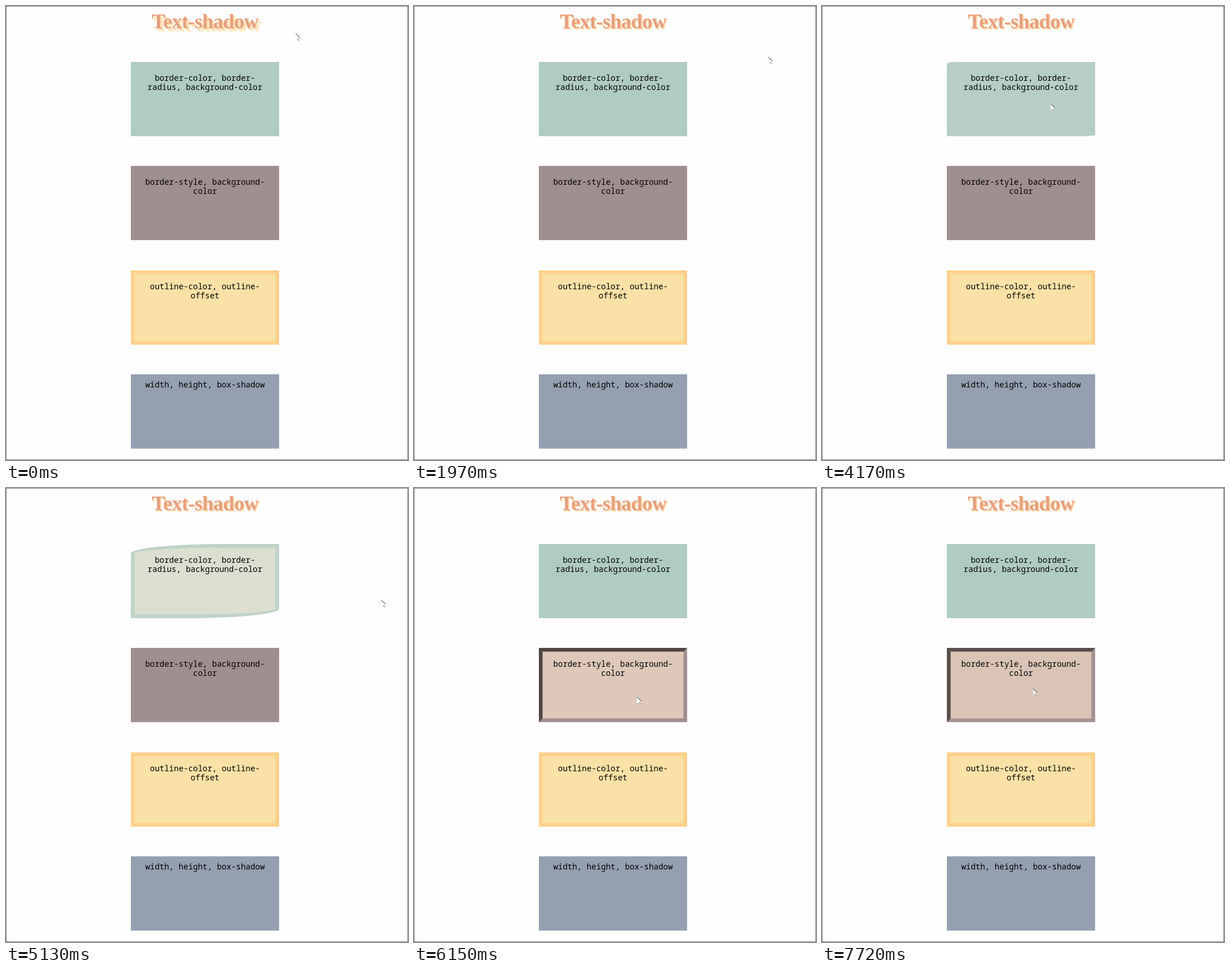
Animation of 705 by 795 pixels, one loop 8 s. Source, as an HTML page:

```html
<!DOCTYPE html>
<html lang="en">
<head>
<meta charset="utf-8">
<title>Hover transitions</title>
<style>
  html, body { margin: 0; width: 100%; height: 100%; overflow: hidden; background: #fefefe; }
  #stage {
    position: relative; width: 705px; height: 795px; box-sizing: border-box;
    overflow: hidden; border: 1px solid #7d7d7d;
  }
  #stage > * { position: absolute; }
  #title {
    left: 254.5px; top: 6px; margin: 0; white-space: nowrap; color: #e79f7f;
    font: bold 36px/40px "Liberation Serif", serif; letter-spacing: -.7px;
  }
  /* Boxes are laid out at 400 x 200 and shown at 65 %. */
  .box {
    left: 218.2px; top: calc(97.2px + 182.2px * var(--i));
    width: 400px; height: 200px; box-sizing: border-box; padding-top: 20px;
    transform: scale(.65); transform-origin: 0 0; border: 10px solid transparent;
    font: 21.5px/25px "Noto Sans Mono", monospace; text-align: center; white-space: nowrap; color: #000;
  }
  #radius { --i: 0; }
  #style { --i: 1; }
  #outline { --i: 2; background: #fae1a7; border-color: #ffd08c; }
  #size { --i: 3; background: #94a0b0; border: 0; padding-top: 15px; }
  #cursor { left: -1px; top: -1px; overflow: visible; }
</style>
</head>
<body>
<div id="stage">
  <h1 id="title">Text-shadow</h1>
  <div class="box" id="radius">border-color, border-<br>radius, background-color</div>
  <div class="box" id="style">border-style, background-<br>color</div>
  <div class="box" id="outline">outline-color, outline-<br>offset</div>
  <div class="box" id="size">width, height, box-shadow</div>
  <svg id="cursor" width="9" height="14" fill="none">
    <path d="M0 0V11.5L2.6 9.2L4.6 13.4L6.6 12.5L4.8 8.6H8.2Z" fill="#fff"/>
    <path d="M.2 .2L7.8 7.8" stroke="#222"/>
    <path d="M2.6 9.6L4.6 8.8L6.4 12L5 12.8L3.4 10" stroke="#8a8a8a" stroke-width=".8"/>
  </svg>
</div>
<script>
const LOOP = 8000, LAST_CHANGE = 7720, FADE = 500;
const [title, radius, style, cursor] =
  ["title", "radius", "style", "cursor"].map(id => document.getElementById(id).style);

const mix = (a, b, s) => a + (b - a) * s;
const rgb = (a, b, s) => `rgb(${a.map((v, i) => mix(v, b[i], s))})`;

// Times at which the pointer alternately enters and leaves an element
const toggles = {
  title: [-900, -150, 390, 1560],
  radius: [2520, 3285, 4120, 5015],
  style: [5670, 6540, 7380]
};

// Pointer moves, each from where the previous one stopped
const start = [508, 48];
const moves = [
  { from: 390, to: 840, at: [400, 34] },
  { from: 1490, to: 1970, at: [621, 89] },
  { from: 2240, to: 2900, at: [410, 158] },
  { from: 3240, to: 3400, at: [540, 156] },
  { from: 3990, to: 4170, at: [401, 171] },
  { from: 4870, to: 5130, at: [658, 196] },
  { from: 5250, to: 6150, at: [391, 366] },
  { from: 6540, to: 6730, at: [533, 360] },
  { from: 7240, to: 7720, at: [370, 351] }
];

// CSS "ease": cubic-bezier(.25, .1, .25, 1)
function ease(x) {
  if (x <= 0 || x >= 1) return x <= 0 ? 0 : 1;
  const bezier = (a, b, u) => 3 * a * u * (1 - u) ** 2 + 3 * b * u * u * (1 - u) + u ** 3;
  let low = 0, high = 1;
  for (let i = 0; i < 20; i++) {
    const mid = (low + high) / 2;
    if (bezier(.25, .25, mid) < x) low = mid; else high = mid;
  }
  return bezier(.1, 1, low);
}

const hover = (times, t) =>
  times.reduce((s, time, i) => s + (i % 2 ? -1 : 1) * ease((t - time) / FADE), 0);

const isInside = (times, t) => times.filter(time => time <= t).length % 2 === 1;

const pointer = t => moves.reduce((point, { from, to, at }) => {
  const k = ease((t - from) / (to - from));
  return point.map((v, i) => mix(v, at[i], k));
}, start);

function draw(time) {
  let t = time % LOOP;
  t = t < 90 ? 0 : Math.min(t, LAST_CHANGE);

  const lift = hover(toggles.title, t);
  const near = 2 + 2 * lift, far = 2 + 8 * lift;
  title.textShadow = `${near}px ${near}px #fcdcae, ${far}px ${far}px #fdecc9`;

  const round = hover(toggles.radius, t);
  radius.background = rgb([176, 203, 195], [242, 235, 216], round);
  radius.borderColor = `rgba(176,203,195,${round})`;
  radius.borderRadius = `${100 * round}% 0 / ${20 * round}% 0`;

  const sunk = hover(toggles.style, t);
  const light = `rgba(160,143,142,${sunk})`;
  const dark = isInside(toggles.style, t) ? `rgba(79,70,69,${sunk})` : light;
  style.background = rgb([159, 143, 142], [221, 200, 186], sunk);
  style.borderColor = `${dark} ${light} ${light} ${dark}`;

  const [x, y] = pointer(t);
  cursor.transform = `translate(${x}px, ${y}px)`;
}

function tick() {
  draw(performance.now());
  requestAnimationFrame(tick);
}
tick();
</script>
</body>
</html>
```
